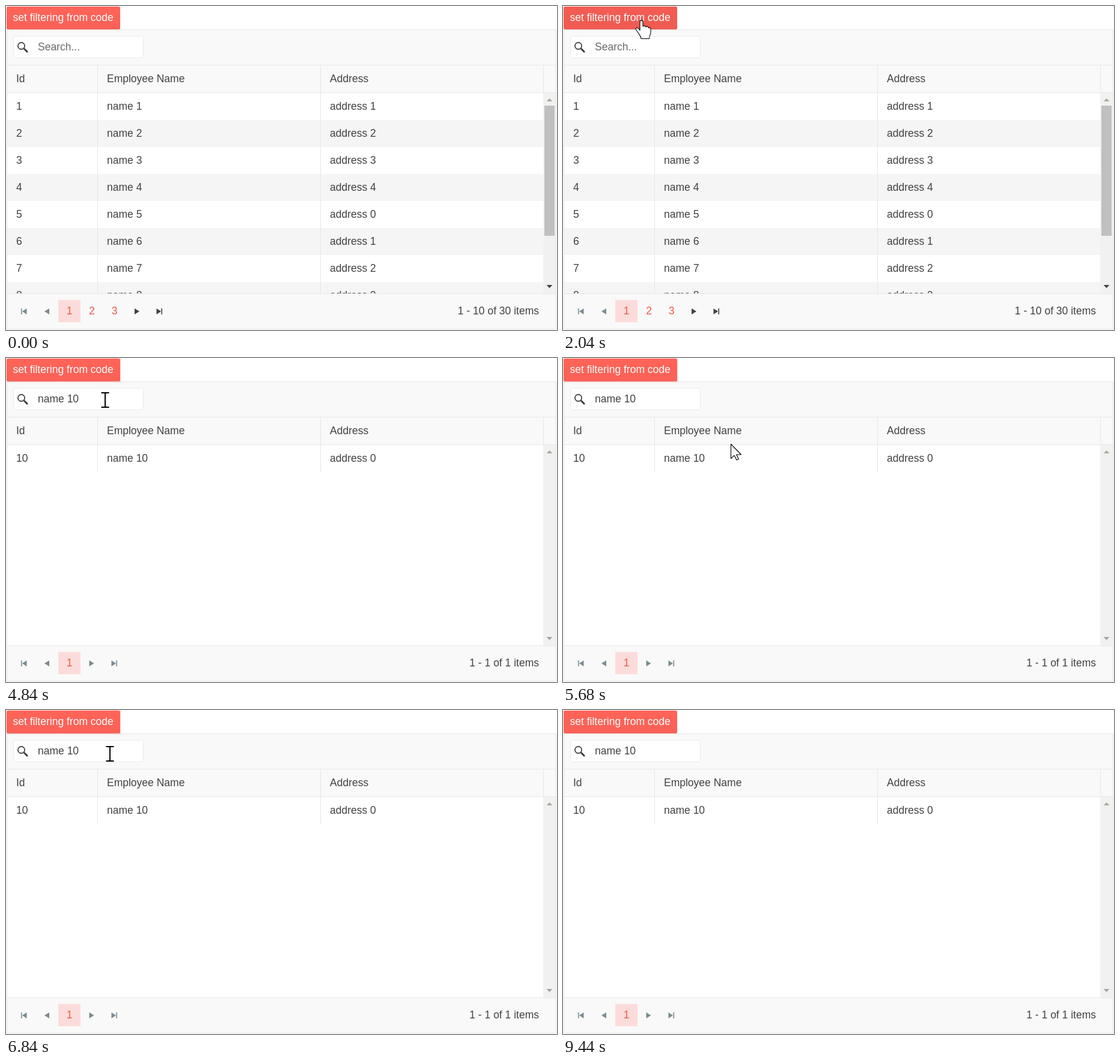
Animation, 917 px wide and 540 px high, one loop 9.57 s. Source, as an HTML page:

```html
<!DOCTYPE html>
<html lang="en">
<head>
<meta charset="utf-8">
<title>Grid filtering</title>
<style>
html, body { margin: 0; width: 100%; height: 100%; overflow: hidden; background: #fff }
svg { display: block; width: 100vw; height: 100vh; font: 17.5px "Liberation Sans", Arial, sans-serif; fill: #424242 }
.line { fill: #e6e6e6 }
.off { fill: #7b8b92 }
.red { fill: #f5554a; text-anchor: middle }
.end { text-anchor: end }
.cursor { fill: #fff; stroke: #000; stroke-width: 1.1; stroke-linejoin: round }
</style>
</head>
<body>
<svg viewBox="0 0 917 540">
  <defs>
    <clipPath id="body"><rect x="2" y="145" width="892" height="334"/></clipPath>
    <path id="prev" d="M-4 0L4-5V5z"/>
    <path id="next" d="M4 0L-4-5V5z"/>
    <path id="first" d="M-5-5h1.6V5H-5zM-3 0L4.5-5V5z"/>
    <path id="last" d="M5-5H3.4V5H5zM3 0L-4.5-5V5z"/>
    <linearGradient id="shade" x2="0" y2="1">
      <stop stop-color="#000" stop-opacity="0"/><stop offset="1" stop-opacity=".02"/>
    </linearGradient>
  </defs>

  <!-- frame, toolbar, header -->
  <rect class="line" x="1" y="39" width="915" height="500"/>
  <rect x="2" y="40" width="913" height="498" fill="#f9f9f9"/>
  <rect x="12.5" y="50.5" width="216" height="36" rx="2" fill="#fff" stroke="#ebebeb"/>
  <g fill="none" stroke="#333"><circle cx="25.5" cy="66.5" r="5.6" stroke-width="1.6"/><path d="M30 71l6 6" stroke-width="2.6"/></g>
  <text id="query" x="53" y="74"></text>
  <rect class="line" x="2" y="98" width="913" height="1"/>
  <rect class="line" x="2" y="144" width="913" height="1"/>
  <rect class="line" x="152" y="98" width="1" height="46"/>
  <rect class="line" x="523" y="98" width="1" height="46"/>
  <rect class="line" x="894" y="98" width="1" height="46"/>
  <text x="17" y="127">Id</text>
  <text x="168" y="127">Employee Name</text>
  <text x="539" y="127">Address</text>

  <!-- table body -->
  <rect x="2" y="145" width="892" height="334" fill="#fff"/>
  <rect x="894" y="145" width="21" height="334" fill="#f1f1f1"/>
  <path d="M899.5 159h10l-5-5z" fill="#adad9f"/>
  <path id="down" d="M899.5 465h10l-5 5z"/>
  <rect class="line" x="2" y="479" width="913" height="1"/>
  <use href="#first" x="30" y="509" class="off"/>
  <use href="#prev" x="68" y="509" class="off"/>
  <rect x="87" y="490" width="37" height="37" fill="#fcdcda"/>
  <text class="red" x="105.5" y="514">1</text>

  <g id="all">
    <g class="rows" clip-path="url(#body)"></g>
    <rect x="896" y="166" width="17" height="217" fill="#c0c0c0"/>
    <text class="red" x="143" y="514">2</text>
    <text class="red" x="180.5" y="514">3</text>
    <use href="#next" x="218" y="509"/>
    <use href="#last" x="255" y="509"/>
    <text class="end" x="887" y="514">1 - 10 of 30 items</text>
  </g>
  <g id="found">
    <g class="rows" clip-path="url(#body)"></g>
    <use href="#next" x="142.5" y="509" class="off"/>
    <use href="#last" x="180" y="509" class="off"/>
    <text class="end" x="887" y="514">1 - 1 of 1 items</text>
  </g>

  <!-- button -->
  <rect id="ring" x="0" y="0" width="192" height="41" rx="3" fill="#ff6358" opacity=".15"/>
  <rect id="button" x="1" y="1" width="189" height="38" rx="2"/>
  <rect x="1" y="1" width="189" height="38" rx="2" fill="url(#shade)"/>
  <text x="11.5" y="25" fill="#fff">set filtering from code</text>

  <g id="cursor">
    <path id="arrow" class="cursor" d="M.5.5V24.5L6 19.3 10 27 13.2 25.6 9.6 18H17.5z"/>
    <path id="hand" class="cursor" d="M-3 2.5C-3-1 2-1 2 2.5V10C3 8.5 7 8.5 7 11 8 9.5 11.5 10 11.5 12.5 13 11.5 15 12.5 15 14.5V20C15 24 12.5 25 12.5 30.5H-1C-1 26-4 24-6 20.5L-9.5 15.5C-11 13-7.5 11-5.5 13.5L-3 16.5z"/>
    <path id="beam" d="M-6.5-12h13M-6.5 12h13M0-12V12" fill="none" stroke="#000" stroke-width="2"/>
  </g>
</svg>
<script>
const $ = id => document.getElementById(id);
const show = (id, on) => $(id).style.display = on ? '' : 'none';
const LOOP = 9570, STEP = 69.2, FILTERED = 2570;

// Pointer path: [time, x, y]
const arrive = [[650, 540, 520], [860, 430, 350], [1134, 298, 198], [1560, 180, 62],
  [1820, 148, 30], [2034, 131, 24]];
const leave = [[3170, 131, 26], [3654, 150, 38], [4070, 172, 113], [4550, 135, 25],
  [5050, 198, 113], [5661, 279, 143], [6020, 284, 157], [6350, 235, 242], [6838, 173, 73],
  [6910, 169, 54], [6980, 168, 61], [7500, 335, 225], [7950, 648, 392], [8580, 852, 532]];

function addRows(group, ids) {
  group.innerHTML = ids.map((id, i) => {
    const y = 145 + 45 * i, text = (x, s) => `<text x="${x}" y="${y + 28}">${s}</text>`;
    const line = x => `<rect class="line" x="${x}" y="${y}" width="1" height="45"/>`;
    return `<rect class="row" x="2" y="${y}" width="892" height="45"/>` + line(152) + line(523) +
      text(17, id) + text(168, 'name ' + id) + text(539, 'address ' + id % 5);
  }).join('');
}
addRows(document.querySelector('#all .rows'), [1, 2, 3, 4, 5, 6, 7, 8]);
addRows(document.querySelector('#found .rows'), [10]);

// Smooth curve through the timed points
function along(path, t) {
  const last = path.length - 1;
  if (t >= path[last][0]) return path[last].slice(1);
  const i = Math.max(0, path.findIndex(p => p[0] > t) - 1);
  const slope = (k, c) => {
    const a = path[Math.max(k - 1, 0)], b = path[Math.min(k + 1, last)];
    return (b[c] - a[c]) / (b[0] - a[0]);
  };
  const p = path[i], q = path[i + 1], d = q[0] - p[0], u = (t - p[0]) / d, v = 1 - u;
  return [1, 2].map(c => p[c] * v * v * (1 + 2 * u) + q[c] * u * u * (3 - 2 * u) +
    d * u * v * (slope(i, c) * v - slope(i + 1, c) * u));
}

function draw(t) {
  const path = t < 3170 ? arrive : leave, start = path[0][0];
  const visible = t >= 650 && t < 8650;
  const [x, y] = along(path, start + Math.max(0, Math.floor((t - start) / STEP)) * STEP);
  const filtered = t >= FILTERED;
  const onButton = visible && x < 190 && y < 37;
  const onSearch = x > 12 && x < 229 && y > 50 && y < 87;

  show('all', !filtered);
  show('found', filtered);
  $('query').textContent = filtered ? 'name 10' : 'Search...';
  $('query').setAttribute('fill', filtered ? '#424242' : '#6a6a6a');
  $('down').setAttribute('fill', filtered ? '#a3a3a3' : '#404040');
  $('button').setAttribute('fill', onButton ? '#f35c52' : '#ff6358');
  show('ring', t >= 2510 && t < 9440);

  const hovered = visible && y >= 145 && y < 479 && x < 894 ? Math.floor((y - 145) / 45) : -1;
  for (const id of ['all', 'found'])
    document.querySelectorAll(`#${id} .row`).forEach((row, i) =>
      row.setAttribute('fill', i === hovered ? '#ebeded' : i % 2 ? '#f5f5f5' : '#fff'));

  show('cursor', visible);
  $('cursor').setAttribute('transform', `translate(${Math.round(x)} ${Math.round(y)})`);
  show('hand', onButton);
  show('beam', onSearch);
  show('arrow', !onButton && !onSearch);
}

const begin = performance.now();
function tick() {
  draw((performance.now() - begin) % LOOP);
  requestAnimationFrame(tick);
}
tick();
</script>
</body>
</html>
```
